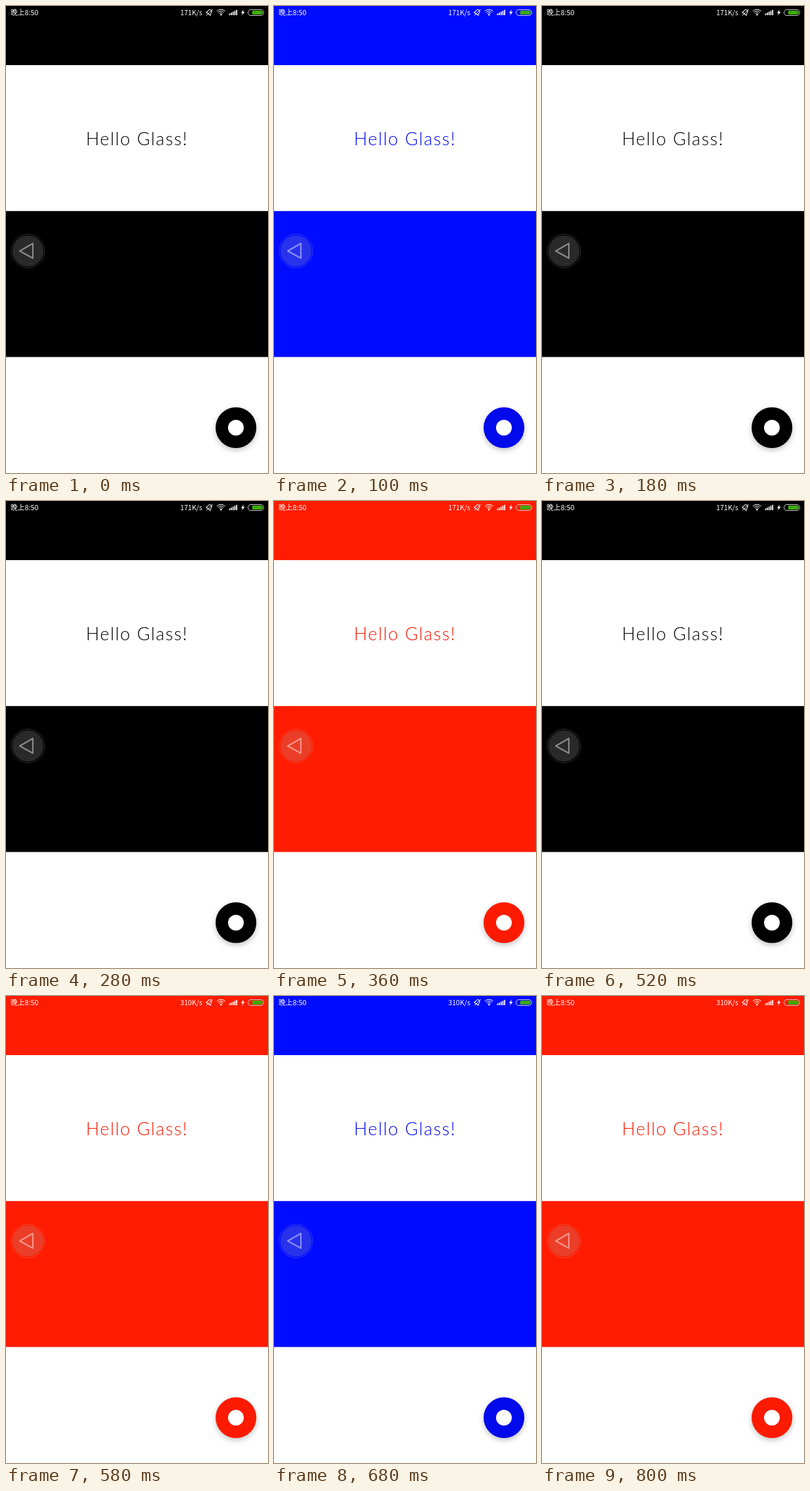
Animation, 400 px wide and 711 px high, one loop 0.84 s. Source, as an HTML page with a canvas:

```html
<!DOCTYPE html>
<html lang="zh">
<head>
<meta charset="utf-8">
<title>Hello Glass!</title>
<style>
  html, body { margin: 0; width: 100%; height: 100%; overflow: hidden; background: #fff; }
  canvas { display: block; }
</style>
</head>
<body>
<canvas id="stage" width="400" height="711"></canvas>
<script>
const ctx = document.getElementById('stage').getContext('2d');
const STATUS_FONT = '"Noto Sans CJK SC", "Noto Sans CJK JP", "Noto Sans CJK", "Noto Sans", sans-serif';
const TITLE_FONT = 'Lato, "Open Sans", sans-serif';
const TAU = Math.PI * 2;

const BLACK = { band: '#000', text: '#000', fab: '#000' };
const BLUE = { band: '#000cff', text: '#0008f0', fab: '#000aeb' };
const RED = { band: '#ff1c00', text: '#f51800', fab: '#fc1a00' };

// Three strobes of twelve flashes; a held tick repeats the flash before it.
const TICK = 20, TICKS = 42, FLASHES = 12;
const STROBES = [[BLACK, BLUE], [BLACK, RED], [BLUE, RED]];
const HELD = [8, 12, 15, 25, 37, 41];

function disc(x, y, r, fill) {
  ctx.beginPath();
  ctx.arc(x, y, r, 0, TAU);
  ctx.fillStyle = fill;
  ctx.fill();
}

function path(points, closed) {
  ctx.beginPath();
  points.forEach(([x, y]) => ctx.lineTo(x, y));
  if (closed) ctx.closePath();
}

function label(text, x, y, font, fill, spacing = 0) {
  ctx.font = font;
  ctx.letterSpacing = `${spacing}px`;
  ctx.fillStyle = fill;
  ctx.fillText(text, x, y);
}

function drawMutedBell() {
  ctx.save();
  ctx.translate(310.5, 9.5);
  ctx.rotate(0.6);
  ctx.beginPath();
  ctx.moveTo(-4, 3);
  ctx.quadraticCurveTo(-2.8, 1.5, -2.8, -1);
  ctx.arc(0, -1.2, 2.8, Math.PI, 0);
  ctx.quadraticCurveTo(2.8, 1.5, 4, 3);
  ctx.closePath();
  ctx.stroke();
  ctx.restore();
  path([[306, 14.5], [315.5, 5]]);
  ctx.stroke();
}

function drawWifi() {
  for (const r of [3.6, 6.2, 8.8]) {
    ctx.beginPath();
    ctx.arc(328.3, 14, r, -Math.PI * 0.76, -Math.PI * 0.24);
    ctx.stroke();
  }
  disc(328.3, 13.3, 1.2, '#fff');
}

function drawBattery() {
  ctx.strokeStyle = '#ccc';
  ctx.lineWidth = 1;
  ctx.beginPath();
  ctx.roundRect(369.5, 5.5, 24, 9, 4.5);
  ctx.stroke();
  ctx.fillStyle = '#3cab08';
  ctx.beginPath();
  ctx.roundRect(376, 7, 16, 6, [0, 3, 3, 0]);
  ctx.fill();
}

function drawStatusBar(speed) {
  label('晚上8:50', 7, 14, `10.8px ${STATUS_FONT}`, '#fff');
  label(speed, 266, 14, `10.6px ${STATUS_FONT}`, '#fff');
  ctx.strokeStyle = '#fff';
  ctx.lineWidth = 1;
  drawMutedBell();
  drawWifi();
  ctx.fillStyle = '#fff';
  for (let i = 0; i < 5; i++) {
    const h = 2.5 + i * 1.4;
    ctx.fillRect(340.5 + i * 2.7, 14 - h, 1.7, h);
  }
  path([[363, 5.5], [358.8, 10.6], [361.2, 10.6], [360, 14.5], [364.5, 9], [362, 9]], true);
  ctx.fill();
  drawBattery();
}

function drawBackButton() {
  disc(33.5, 373, 23.8, 'rgba(170,170,170,.24)');
  ctx.strokeStyle = 'rgba(190,190,190,.24)';
  ctx.lineWidth = 1;
  ctx.beginPath();
  ctx.arc(33.5, 373, 25.7, 0, TAU);
  ctx.stroke();
  ctx.strokeStyle = 'rgba(255,255,255,.45)';
  ctx.lineWidth = 2.2;
  ctx.lineJoin = 'round';
  path([[21, 373], [41, 361.5], [41, 384]], true);
  ctx.stroke();
}

function drawActionButton(fill) {
  ctx.save();
  ctx.shadowColor = 'rgba(0,0,0,.25)';
  ctx.shadowBlur = 8;
  ctx.shadowOffsetY = 3;
  disc(351.1, 642, 31.1, fill);
  ctx.restore();
  disc(351, 642, 12, '#fff');
}

function draw(time) {
  const tick = Math.floor(time / TICK) % TICKS;
  const flash = tick - HELD.filter(t => t <= tick).length;
  const strobe = Math.floor(flash / FLASHES);
  const color = STROBES[strobe][flash % 2];

  ctx.fillStyle = '#fff';
  ctx.fillRect(0, 0, 400, 711);
  ctx.fillStyle = color.band;
  ctx.fillRect(0, 0, 400, 90);
  ctx.fillRect(0, 312.2, 400, 222.2);

  drawStatusBar(strobe < 2 ? '171K/s' : '310K/s');
  ctx.textAlign = 'center';
  label('Hello Glass!', 200, 212, `300 27px ${TITLE_FONT}`, color.text, 1.6);
  ctx.textAlign = 'left';
  drawBackButton();
  drawActionButton(color.fab);
}

const start = performance.now();
function loop() {
  draw(performance.now() - start);
  requestAnimationFrame(loop);
}
loop();
</script>
</body>
</html>
```
